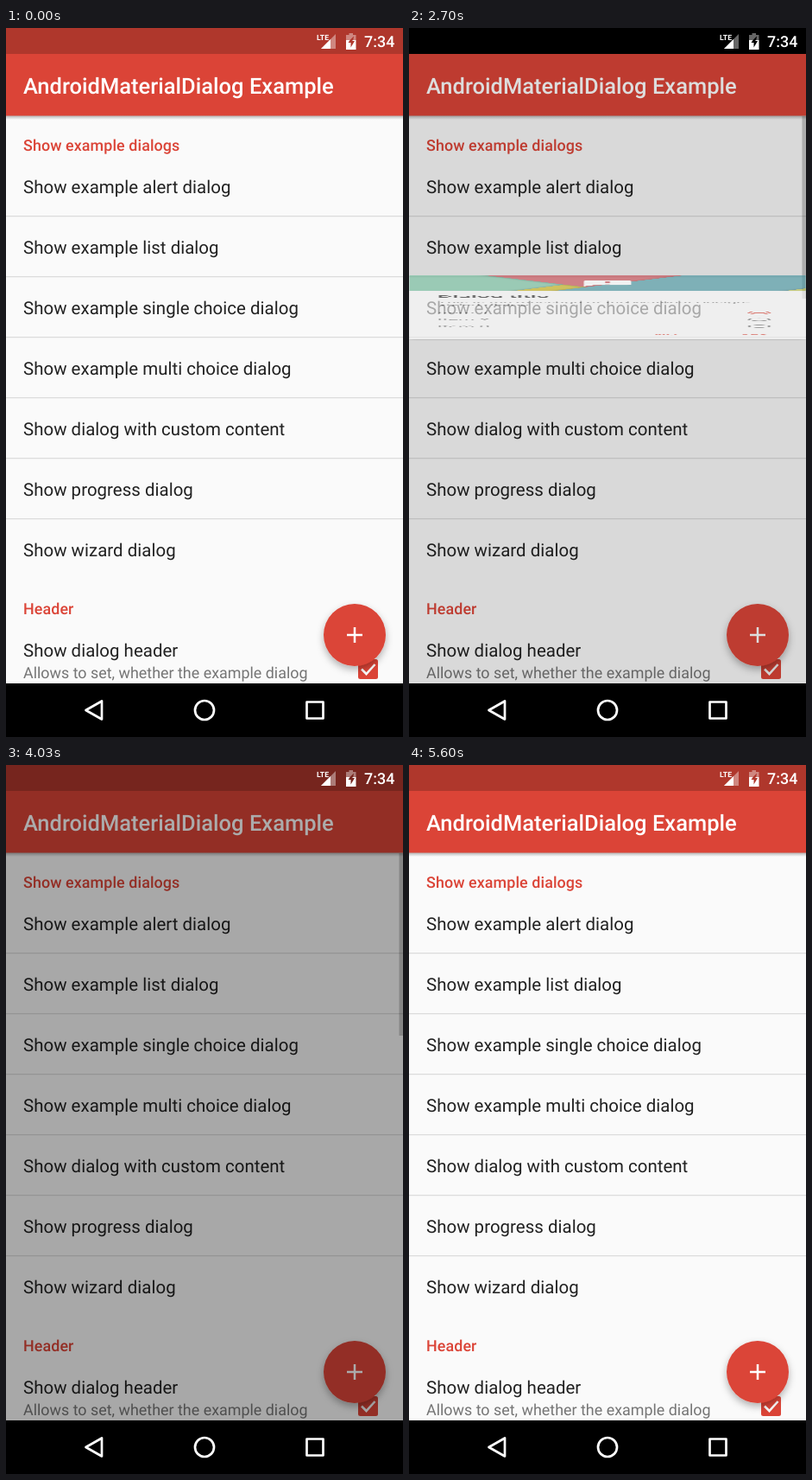
Recreate the animation shown at these times as an HTML page. Size 460 by 820 pixels, loop 5670 ms.

```html
<!DOCTYPE html>
<html lang="en">
<head>
<meta charset="utf-8">
<title>Rectangular reveal dialog</title>
<style>
  html, body { margin: 0; width: 100%; height: 100%; overflow: hidden; background: #000; }
  svg { display: block; width: 460px; height: 820px; }
  text {
    font: 400 20.44px Roboto, sans-serif;
    letter-spacing: .03px;
    fill: #212121;
    text-rendering: geometricPrecision;
  }
  .title { font-size: 25.5px; font-weight: 500; letter-spacing: 0; }
  .small { font-size: 17.9px; letter-spacing: 0; }
  .accent { font-size: 17.9px; font-weight: 500; letter-spacing: .08px; fill: #db4437; }
  .muted { fill: #757575; }
  .light { fill: #fff; }
  .clock { font-size: 17.9px; font-weight: 500; }
  .lte { font-size: 8.6px; font-weight: 700; }

  .anim { animation: 5670ms linear infinite; }
  .bar { animation-name: bar; }
  .scrim { animation-name: scrim; }
  .status { animation-name: status; }
  .dialog { animation-name: fade; }
  .reveal { animation-name: reveal; transform-origin: 0 0; }

  @keyframes bar {
    0%, 47.08% { opacity: 0; }
    47.5%, 77.6% { opacity: .2; }
    82%, 100% { opacity: 0; }
  }
  @keyframes scrim {
    0%, 47.09% { opacity: 0; }
    47.62% { opacity: .13; }
    49.91%, 69.4% { opacity: .6; }
    72.84% { opacity: .05; }
    73.1%, 100% { opacity: 0; }
  }
  @keyframes status {
    0%, 47.08% { opacity: 0; }
    47.09%, 69.31% { opacity: 1; }
    70.4%, 100% { opacity: 0; }
  }
  @keyframes fade {
    0%, 47.26% { opacity: 0; }
    47.62% { opacity: .6; }
    47.88%, 68.78% { opacity: 1; }
    69.84%, 100% { opacity: 0; }
  }
  /* From the tapped row's rectangle to the dialog's and back */
  @keyframes reveal {
    0%, 47.48% {
      transform: translate(0, 288px) scale(1.0551, .1196);
      animation-timing-function: cubic-bezier(.37, 0, .63, 1);
    }
    49.95% { transform: translate(12px, 104px) scale(1, 1); }
    66.6% {
      transform: translate(12px, 104px) scale(1, 1);
      animation-timing-function: cubic-bezier(.37, 0, .63, 1);
    }
    69.15%, 100% { transform: translate(0, 288px) scale(1.0551, .1196); }
  }
</style>
</head>
<body>
<svg viewBox="0 0 460 820">
  <defs>
    <clipPath id="banner"><path d="M0 142V2Q0 0 2 0H434Q436 0 436 2V142Z"/></clipPath>
    <filter id="edge" x="-20%" y="-20%" width="140%" height="140%">
      <feDropShadow dx="0" dy="1" stdDeviation="5" flood-color="#000" flood-opacity=".5"/>
    </filter>
    <filter id="lift" x="-30%" y="-30%" width="160%" height="170%">
      <feDropShadow dx="0" dy="4" stdDeviation="4" flood-color="#000" flood-opacity=".3"/>
    </filter>
    <linearGradient id="drop" x2="0" y2="1">
      <stop stop-opacity=".3"/>
      <stop offset="1" stop-opacity="0"/>
    </linearGradient>
  </defs>

  <rect width="460" height="760" fill="#fafafa"/>
  <g id="list">
    <text class="accent" x="20" y="141.5">Show example dialogs</text>
    <text class="accent" x="20" y="678">Header</text>
    <text x="20" y="727">Show dialog header</text>
    <text class="small muted" x="20" y="752">Allows to set, whether the example dialog</text>
  </g>
  <rect x="408" y="730" width="23" height="23" rx="2.5" fill="#db4437"/>
  <path d="M412 741.5l5.5 5.5 10-11" fill="none" stroke="#fafafa" stroke-width="2.6"/>

  <rect y="101" width="460" height="5" fill="url(#drop)"/>
  <rect y="30" width="460" height="71.5" fill="#db4437"/>
  <text class="title light" x="20" y="76">AndroidMaterialDialog Example</text>
  <rect class="anim bar" x="455.5" y="102" width="4.5" height="211" opacity="0"/>

  <circle cx="404" cy="702" r="36" fill="#db4437" filter="url(#lift)"/>
  <path d="M395 702h18M404 693v18" stroke="#fff" stroke-width="2.5"/>

  <rect width="460" height="30" fill="#af372c"/>
  <rect class="anim scrim" width="460" height="758" opacity="0"/>
  <rect class="anim status" width="460" height="30" opacity="0"/>
  <g class="light">
    <text class="lte light" x="360" y="13.5">LTE</text>
    <path d="M382 7V24H365Z" opacity=".4"/>
    <path d="M376 13V24H365Z"/>
    <g fill-rule="evenodd">
      <path d="M394 14V8h3.500V6h4.500v2h3.500v6h-3.200l.7-4.500-4.500 4.500Z" opacity=".4"/>
      <path d="M394 14h11.500V25H394ZM398.500 14l-2 3h3v5.500l4.500-7.500h-2.500V14Z"/>
    </g>
    <text class="clock light" x="415" y="22">7:34</text>
  </g>

  <rect y="758" width="460" height="62"/>
  <g fill="none" stroke="#fff" stroke-width="2.7" stroke-linejoin="round">
    <path d="M92.500 789L111 778.500V799.500Z"/>
    <circle cx="230" cy="789" r="11"/>
    <rect x="348.500" y="779.500" width="19" height="19"/>
  </g>

  <g class="anim dialog" opacity="0">
    <g class="anim reveal">
      <rect width="436" height="577" rx="2.5" fill="#fcfcfc" filter="url(#lift)"/>
      <g clip-path="url(#banner)">
        <rect width="436" height="142" fill="#74c09f"/>
        <path d="M112 142L171 83 240 60 200 160H94Z" fill="#c8b414" filter="url(#edge)"/>
        <path d="M80 -5H306L195 105Z" fill="#c84b52" filter="url(#edge)"/>
        <path d="M306 -5L152 147H460V-5Z" fill="#4697a2" filter="url(#edge)"/>
        <path d="M405 147L441 112V147Z" fill="#bcc246" filter="url(#edge)"/>
      </g>
      <path transform="translate(186.800 40.800) scale(2.6)" fill="#fff" fill-rule="evenodd"
        d="M20 2H4C2.900 2 2 2.900 2 4V22l4-4H20c1.100 0 2-.9 2-2V4c0-1.100-.9-2-2-2ZM13 11H11V5h2ZM13 15H11V13h2Z"/>
      <text class="title" x="31" y="199">Dialog title</text>
      <text class="small muted" x="31" y="251">This is the message of the Material Design-</text>
      <text class="small muted" x="31" y="271.500">styled dialog.</text>
      <g id="items"></g>
      <text class="accent" x="269.500" y="539.500">NO</text>
      <text class="accent" x="363.500" y="539.500">YES</text>
    </g>
  </g>
</svg>
<script>
  const NS = 'http://www.w3.org/2000/svg';

  function add(parent, tag, attrs, text = '') {
    const el = document.createElementNS(NS, tag);
    for (const key in attrs) el.setAttribute(key, attrs[key]);
    el.textContent = text;
    parent.append(el);
  }

  const list = document.getElementById('list');
  const rows = ['example alert dialog', 'example list dialog', 'example single choice dialog',
    'example multi choice dialog', 'dialog with custom content', 'progress dialog', 'wizard dialog'];
  rows.forEach((name, i) => {
    const y = 190.5 + i * 70;
    add(list, 'text', { x: 20, y }, 'Show ' + name);
    if (i < rows.length - 1) {
      add(list, 'rect', { x: 0, y: y + 26.5, width: 460, height: 1.3, fill: '#dcdcdc' });
    }
  });

  const items = document.getElementById('items');
  for (let i = 0; i < 3; i++) {
    const cy = 337 + i * 60.8;
    const color = i ? '#757575' : '#db4437';
    add(items, 'text', { class: 'muted', x: 31, y: cy + 7.5 }, 'Item ' + (i + 1));
    add(items, 'circle', { cx: 384.7, cy, r: 11.5, fill: 'none', stroke: color, 'stroke-width': 2.5 });
    if (!i) add(items, 'circle', { cx: 384.7, cy, r: 6.5, fill: color });
  }
</script>
</body>
</html>
```
